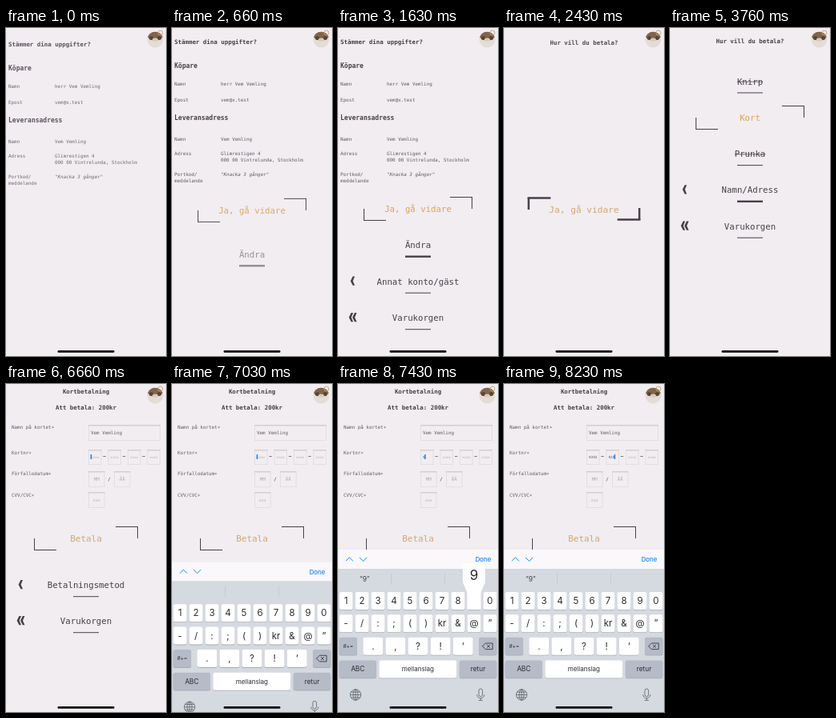
Animation, 200 px wide and 410 px high, one loop 8.33 s. Source, as an HTML page with a canvas:

```html
<!DOCTYPE html>
<html lang="sv">
<head>
<meta charset="utf-8">
<title>Kassa</title>
<style>
  html, body { margin: 0; width: 100%; height: 100%; overflow: hidden; background: #f1edf1; }
  canvas { display: block; width: 200px; height: 410px; }
</style>
</head>
<body>
<canvas id="stage"></canvas>
<script>
const W = 200, H = 410, LOOP = 8330;
const MONO = '"DejaVu Sans Mono", monospace', SANS = 'Inter, sans-serif';
const BG = '#f1edf1', INK = '#484048', SOFT = '#625a62', GOLD = '#dca25a', TAN = '#d0a873';
const BLUE = '#1a84f5', KEY_INK = '#2b2b2f', ICON = '#5a5e66';

const canvas = document.getElementById('stage');
const ctx = canvas.getContext('2d');
const dpr = window.devicePixelRatio || 1;
canvas.width = W * dpr;
canvas.height = H * dpr;

const clamp = v => Math.max(0, Math.min(1, v));
const progress = (t, start, length) => clamp((t - start) / length);
const easeOut = p => 1 - (1 - p) ** 3;
const mix = (a, b, p) => a + (b - a) * p;

function layer(alpha, dx, dy, draw) {
  if (alpha <= 0) return;
  ctx.save();
  ctx.globalAlpha *= alpha;
  ctx.translate(dx, dy);
  draw();
  ctx.restore();
}

function rect(x, y, w, h, color, radius = 0) {
  ctx.fillStyle = color;
  ctx.beginPath();
  ctx.roundRect(x, y, w, h, radius);
  ctx.fill();
}

function ellipse(x, y, rx, ry, color) {
  ctx.fillStyle = color;
  ctx.beginPath();
  ctx.ellipse(x, y, rx, ry, 0, 0, 7);
  ctx.fill();
}

function line(points, color, width = 1, join = 'miter') {
  ctx.strokeStyle = color;
  ctx.lineWidth = width;
  ctx.lineJoin = join;
  ctx.beginPath();
  points.forEach(([x, y]) => ctx.lineTo(x, y));
  ctx.stroke();
}

// y is the middle of the capitals
function text(str, x, y, size, { color = INK, style = '', align = 'left', family = MONO } = {}) {
  ctx.font = `${style} ${size}px ${family}`;
  ctx.fillStyle = color;
  ctx.textAlign = align;
  ctx.fillText(str, x, y + size * 0.36);
}

const heading = (str, y) => text(str, 100, y, 7.45, { style: 'bold', align: 'center' });
const small = (str, x, y, style) => text(str, x, y, 5.9, { color: SOFT, style });

function avatar() {
  ctx.save();
  ctx.beginPath();
  ctx.arc(186.5, 14.5, 10, 0, 7);
  ctx.clip();
  rect(176, 4, 21, 21, '#e4dcd6');
  ellipse(186.5, 10, 9.5, 5.5, '#80654d');
  ellipse(181.5, 12.5, 2.5, 2.5, '#5a4535');
  ellipse(191.5, 12.5, 2.5, 2.5, '#5a4535');
  ellipse(186.5, 14.5, 3.5, 2, '#d9cabb');
  ctx.restore();
  ctx.strokeStyle = '#c3a274';
  ctx.lineWidth = 0.9;
  ctx.beginPath();
  ctx.arc(193, 6, 3, 0, 7);
  ctx.stroke();
}

function chevrons(count, y) {
  for (let i = 0; i < count; i++) {
    const x = count === 1 ? 18.4 : 16.4 + i * 4.4;
    ctx.fillStyle = INK;
    ctx.beginPath();
    [[2.6, -5.6], [0, -5.6], [-2.8, 0], [0, 5.6], [2.6, 5.6], [0.2, 0]]
      .forEach(([dx, dy]) => ctx.lineTo(x + dx, y + dy));
    ctx.fill();
  }
}

// Corner brackets swap sides and thicken while pressed
function brackets(y, inset, press) {
  const w = mix(1, 2.5, press);
  for (const side of [1, -1]) {
    ctx.save();
    ctx.translate(100, y);
    ctx.scale(side, side);
    const x = -67.5 + inset - 1.7 * press;
    const shift = mix(0, -14, press), bar = mix(14.5, -13.5, press);
    line([[x, shift], [x, shift + 15]], INK, w);
    line([[x - w / 2, bar], [x + 27.5, bar]], INK, w);
    ctx.restore();
  }
}

function button({ label, y, main, thick, arrows = 0, struck, inset = 0, color = GOLD, size = 10.7 }, press = 0) {
  text(label, 100, y + (main ? 0.5 : 0), mix(size, 11.2, press), {
    color: main ? (press ? TAN : color) : INK, align: 'center',
  });
  if (main) return brackets(y, inset, press);
  const w = thick ? 2.4 : 1;
  rect(84, y + 14.2 - w / 2, 32, w, INK);
  if (struck) {
    const half = ctx.measureText(label).width / 2;
    rect(100 - half, y, half * 2, 0.8, INK);
  }
  chevrons(arrows, y - 0.8);
}

function riseIn(t, start, draw, dx = 0, length = 400) {
  const p = easeOut(progress(t, start, length));
  layer(p, dx, 25 * (1 - p), draw);
}

const reviewButtons = [
  { label: 'Ja, gå vidare', y: 226, main: true },
  { label: 'Ändra', y: 271.5, thick: true },
  { label: 'Annat konto/gäst', y: 317, arrows: 1 },
  { label: 'Varukorgen', y: 362.5, arrows: 2 },
];
const methodButtons = [
  { label: 'Knirp', y: 66.8, struck: true },
  { label: 'Kort', y: 112, main: true },
  { label: 'Prunka', y: 157.4, struck: true },
  { label: 'Namn/Adress', y: 202.6, thick: true, arrows: 1 },
  { label: 'Varukorgen', y: 248, arrows: 2 },
];
const payButtons = [
  { label: 'Betalningsmetod', y: 251.5, arrows: 1 },
  { label: 'Betala', y: 193, main: true, inset: 3, color: TAN, size: 11 },
  { label: 'Varukorgen', y: 296.5, arrows: 2 },
];

function reviewText() {
  text('Stämmer dina uppgifter?', 3, 17, 7.45, { style: 'bold' });
  text('Köpare', 3, 47.5, 8, { style: 'bold' });
  text('Leveransadress', 3, 112, 8, { style: 'bold' });
  const rows = [
    ['Namn', 'herr Vem Vemling', 70], ['Epost', 'vem@x.test', 89.5],
    ['Namn', 'Vem Vemling', 139], ['Adress', 'Glimrestigen 4', 157.3],
    ['', '000 00 Vintrelunda, Stockholm', 164.8],
  ];
  for (const [label, value, y] of rows) {
    small(label, 3, y);
    small(value, 61, y);
  }
  small('Portkod/', 3, 183);
  small('meddelande', 3, 190.5);
  small('"Knacka 3 gånger"', 61, 183, 'italic');
}

// Staggered buttons; the main one stays when the others slide away
function buttonPage(t, buttons, first, pressAt, fadeAt) {
  const out = progress(t, pressAt, 300);
  const press = easeOut(progress(t, pressAt, 200));
  buttons.forEach((b, i) => riseIn(t, first + i * 140, () => {
    const alpha = b.main ? 1 - progress(t, fadeAt, 300) : 1 - out;
    layer(alpha, b.main ? 0 : -40 * out * out, 0, () => button(b, press));
  }));
}

function leavingText(t, at, draw) {
  const out = progress(t, at, 300);
  layer(1 - out, -40 * out * out, 0, draw);
}

function reviewPage(t) {
  riseIn(t, -255, () => leavingText(t, 2000, reviewText), 0, 500);
  buttonPage(t, reviewButtons, 430, 2000, 2450);
}

function methodPage(t) {
  riseIn(t, 2120, () => leavingText(t, 5060, () => heading('Hur vill du betala?', 16.8)), 0, 500);
  buttonPage(t, methodButtons, 2800, 5060, LOOP);
}

function field(x, y, w, h, hint, size) {
  ctx.strokeStyle = '#dfdbdf';
  ctx.lineWidth = 0.8;
  ctx.strokeRect(x + 0.4, y + 0.4, w - 0.8, h - 0.8);
  rect(x, y, w, 1.5, '#d2ced2');
  if (hint) text(hint, x + w / 2, y + h / 2, size, { color: '#b3aeb3', align: 'center' });
}

const DIGITS = '9393939', TYPE_START = 7390, TYPE_STEP = 115;
const typedCount = t => Math.max(0, Math.min(DIGITS.length, Math.floor((t - TYPE_START) / TYPE_STEP) + 1));

function form(t) {
  const labels = [['Namn på kortet∗', 53.8], ['Kortnr∗', 85.6], ['Förfallodatum∗', 112.2], ['CVV/CVC∗', 138.8]];
  labels.forEach(([str, y]) => small(str, 7, y));
  field(103, 51, 90, 20);
  small('Vem Vemling', 106, 61);

  const typed = DIGITS.slice(0, typedCount(t));
  for (let i = 0; i < 4; i++) {
    const x = 103 + i * 24.5, value = typed.slice(i * 4, i * 4 + 4);
    field(x, 82, 16.5, 19, value ? '' : 'xxxx', 4.3);
    text(value, x + 3, 91.5, 4.3, { color: SOFT });
    if (i < 3) rect(x + 18.4, 90.2, 3.4, 0.8, SOFT);
  }
  if (t >= 6560) {
    const box = typed.length < 4 ? 0 : 1;
    rect(105.6 + box * 24.5 + (typed.length - box * 4) * 2.5, 88, 1.6, 6, BLUE, 0.5);
  }

  field(103, 109, 20.5, 20, 'MM', 5.9);
  text('/', 129, 118.5, 5.9, { color: INK, align: 'center' });
  field(135, 109, 20.5, 20, 'ÅÅ', 5.9);
  field(103, 135, 20.5, 20, 'xxx', 5);
}

function selection(t) {
  if (t >= 6530) return;
  const p = progress(t, 5700, 200);
  const left = mix(122, 120, p), right = mix(161, 145.5, p);
  layer(0.75, 0, 0, () => rect(left, 57, right - left, 8.5, '#9cc8f6'));
  text('Vemling', 120.2, 61, 5.9, { color: '#6f97c4' });
  for (const [x, y] of [[left, 55], [right, 66.5]]) {
    rect(x - 0.4, 56, 0.8, 10, '#7fb5f0');
    rect(x - 1.8, y - 1.8, 3.6, 3.6, '#a9cff6', 1.8);
  }
}

function payPage(t) {
  const left = (1 - progress(t, 5660, 700)) ** 3;
  layer(1 - 0.12 * left, 10 * left, 0, () => {
    heading('Kortbetalning', 9.3);
    heading('Att betala: 200kr', 29.5);
  });
  layer(1 - 0.65 * left, 25.5 * left, 0, () => form(t));
  layer(1, 25.5 * left, 0, () => selection(t));
  payButtons.forEach((b, i) => riseIn(t, 5645 + i * 140, () => button(b), 10 * left));
}

function key(label, x, y, w, gray, size = 11.5) {
  rect(x, y + 0.8, w, 22, '#a9acb3', 2.5);
  rect(x, y, w, 22, gray ? '#b5bbc7' : '#fff', 2.5);
  text(label, x + w / 2, y + 11, size, { color: KEY_INK, align: 'center', family: SANS });
}

function popup(t) {
  const n = typedCount(t) - 1;
  if (n < 0 || t - TYPE_START - n * TYPE_STEP > 95) return;
  const x = DIGITS[n] === '9' ? 170 : 50;
  ctx.fillStyle = '#fff';
  ctx.beginPath();
  ctx.roundRect(x - 14, 224, 28, 28, 5);
  ctx.moveTo(x - 14, 248);
  ctx.lineTo(x + 14, 248);
  ctx.lineTo(x + 8.5, 261);
  ctx.lineTo(x + 8.5, 282);
  ctx.lineTo(x - 8.5, 282);
  ctx.lineTo(x - 8.5, 261);
  ctx.fill();
  text(DIGITS[n], x, 239, 17, { color: KEY_INK, align: 'center', family: SANS });
}

function globe(x, y) {
  ctx.strokeStyle = ICON;
  ctx.lineWidth = 0.8;
  for (const rx of [6.7, 3]) {
    ctx.beginPath();
    ctx.ellipse(x, y, rx, 6.7, 0, 0, 7);
    ctx.stroke();
  }
  line([[x, y - 6.7], [x, y + 6.7]], ICON, 0.8);
  for (const [dy, half] of [[-3.4, 5.7], [0, 6.7], [3.4, 5.7]]) {
    line([[x - half, y + dy], [x + half, y + dy]], ICON, 0.8);
  }
}

function microphone(x, y) {
  ctx.strokeStyle = ICON;
  ctx.lineWidth = 0.8;
  ctx.beginPath();
  ctx.roundRect(x - 2.3, y - 7, 4.6, 9.6, 2.3);
  ctx.stroke();
  ctx.beginPath();
  ctx.arc(x, y + 0.2, 4.6, 0, Math.PI);
  ctx.stroke();
  line([[x, y + 4.8], [x, y + 7.4]], ICON, 0.8);
  line([[x - 2.6, y + 7.4], [x + 2.6, y + 7.4]], ICON, 0.8);
}

function keyboard(t) {
  rect(0, 207, W, 204, '#d5d9e0');
  rect(0, 207, W, 24, '#faf8fb');
  line([[9.7, 221.4], [14.3, 216.8], [18.9, 221.4]], BLUE, 1);
  line([[26.9, 216.8], [31.5, 221.4], [36.1, 216.8]], BLUE, 1);
  text('Done', 191.5, 219.4, 7.9, { color: BLUE, style: '500', align: 'right', family: SANS });

  rect(66.3, 237, 0.6, 14, '#bfc3ca');
  rect(133, 237, 0.6, 14, '#bfc3ca');
  const typed = typedCount(t);
  if (typed) text(`“${DIGITS[typed - 1]}”`, 33.3, 244, 8.3, { color: '#444', align: 'center', family: SANS });

  [...'1234567890'].forEach((c, i) => key(c, 1.5 + i * 20, 260, 17));
  ['-', '/', ':', ';', '(', ')', 'kr', '&', '@', '”'].forEach((c, i) => key(c, 1.5 + i * 20, 288.3, 17));
  key('#+=', 1.5, 316.8, 22.5, true, 6.5);
  [...'.,?!‘'].forEach((c, i) => key(c, 31.3 + i * 28.1, 316.8, 25));
  key('', 176, 316.8, 22.5, true);
  line([[180.6, 327.8], [184.4, 324], [193.2, 324], [193.2, 331.6], [184.4, 331.6], [180.6, 327.8], [181, 327.4]], KEY_INK, 0.8, 'round');
  line([[186.2, 325.9], [190, 329.7]], KEY_INK, 0.8);
  line([[190, 325.9], [186.2, 329.7]], KEY_INK, 0.8);
  key('ABC', 1.5, 345.5, 46.5, true, 8.3);
  key('mellanslag', 51.3, 345.5, 97, false, 8);
  key('retur', 151.8, 345.5, 46.5, true, 8.3);
  globe(22, 388.5);
  microphone(178.3, 388);
  popup(t);
}

function render(t) {
  ctx.setTransform(dpr, 0, 0, dpr, 0, 0);
  ctx.globalAlpha = 1;
  rect(0, 0, W, H, BG);
  if (t < 2800) reviewPage(t);
  if (t >= 2120 && t < 5660) methodPage(t);
  if (t >= 5660) payPage(t);
  avatar();
  if (t >= 6800) layer(1, 0, 203 * (1 - progress(t, 6800, 400)) ** 3, () => keyboard(t));
  rect(64.5, 403, 71, 2.8, '#0b0b0b', 1.4);
}

const began = performance.now();
function tick() {
  render((performance.now() - began) % LOOP);
  requestAnimationFrame(tick);
}
tick();
</script>
</body>
</html>
```
